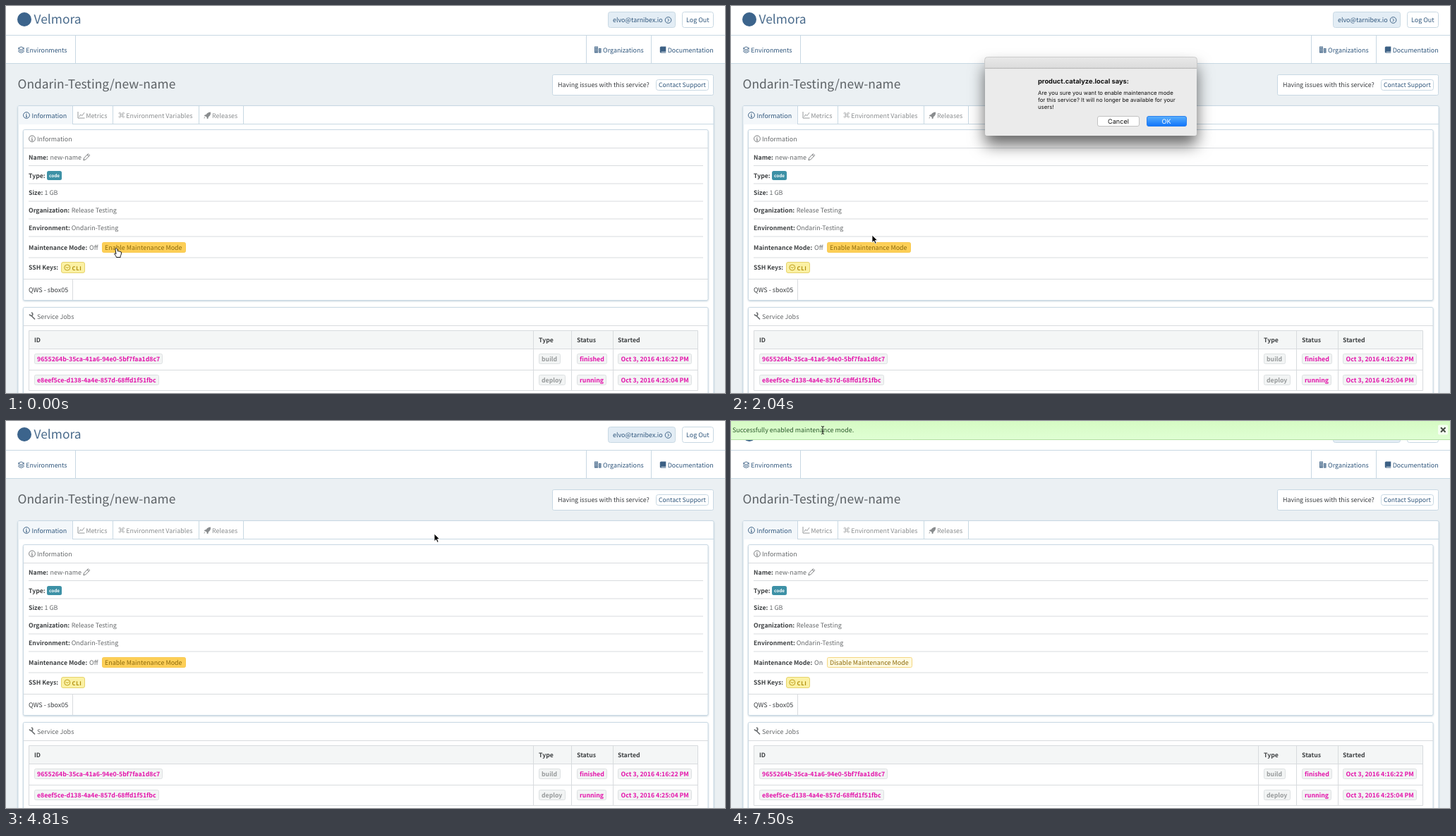
An HTML page for the animation above (8 s loop, 1019 px wide and 549 px high).

```html
<!DOCTYPE html>
<html lang="en">
<head>
<meta charset="utf-8">
<title>Maintenance mode</title>
<style>
html, body { margin: 0; width: 100%; height: 100%; overflow: hidden; background: #fff; }
svg { display: block; width: 1019px; height: 549px; }
text {
  font: 8.95px "Noto Sans CJK JP", "Noto Sans CJK SC", "Noto Sans CJK", "Open Sans", sans-serif;
  text-rendering: geometricPrecision; white-space: pre; fill: #66696b;
}
.big { font-size: 17.4px; font-weight: 300; fill: #5c6165; }
.brand { font-weight: 400; fill: #4a6b8c; }
.blue { fill: #2f567c; }
.dim { fill: #8a8d8f; }
.dark { fill: #3a3d40; }
.bold { font-size: 8.7px; font-weight: 700; fill: #3f4244; }
.pink { font-size: 8.75px; font-weight: 700; fill: #e414ab; }
.grey { font-size: 8.7px; font-weight: 700; fill: #979a9b; }
.amber { fill: #8c6a0c; }
.line { stroke: #d8dbde; fill: none; }
.edge { stroke: #c8d8e3; fill: none; }
.box { stroke: #c8d8e3; fill: #fff; }
.chip { stroke: #dde1e2; fill: #f2f4f4; }
.icon { fill: none; stroke-width: .9; }
.ui text { font-family: Inter, Roboto, sans-serif; font-size: 7.82px; fill: #111; }
.ui .head { font-size: 9.3px; font-weight: 700; }
.ui .btn { font-size: 9.1px; text-anchor: middle; }

.anim * { animation-duration: 8s; animation-iteration-count: infinite; animation-timing-function: step-end; }
#hand { animation-name: hand; }
#arrow { animation-name: arrow; }
#beam { animation-name: beam; }
#cursor { animation-name: move; }
#dialog { animation-name: dialog; transform-origin: 510px 129px; }
#pressed { animation-name: pressed; }
#banner { animation-name: banner; }
#off { animation-name: off; }
#wait { animation-name: wait; }
#on { animation-name: on; }

@keyframes hand { 0% { opacity: 1 } 19.125%, 100% { opacity: 0 } }
@keyframes arrow { 0% { opacity: 0 } 19.125% { opacity: 1 } 43% { opacity: 0 } 50.5% { opacity: 1 } 84.875%, 100% { opacity: 0 } }
@keyframes beam { 0% { opacity: 0 } 43% { opacity: 1 } 50.5% { opacity: 0 } 84.875%, 100% { opacity: 1 } }
@keyframes dialog {
  0% { opacity: 0; transform: scale(.367) }
  21.375% { opacity: .24; transform: scale(.367) }
  23.25% { opacity: 1; transform: scale(1) }
  60.125%, 100% { opacity: 0; transform: scale(1) }
}
@keyframes pressed { 0% { opacity: 0 } 58% { opacity: 1 } 60.125%, 100% { opacity: 0 } }
@keyframes banner { 0% { opacity: 0 } 62.375%, 100% { opacity: 1 } }
@keyframes off { 0% { opacity: 1 } 62.375%, 100% { opacity: 0 } }
@keyframes wait { 0% { opacity: 0 } 62.375% { opacity: 1 } 69.75%, 100% { opacity: 0 } }
@keyframes on { 0% { opacity: 0 } 69.75%, 100% { opacity: 1 } }
@keyframes move {
  0% { transform: translate(157px, 343px) }
  25.375% { transform: translate(200px, 325px) }
  27.5% { transform: translate(345px, 262px) }
  29.625% { transform: translate(520px, 190px) }
  31.75% { transform: translate(611px, 161px) }
  33.625% { transform: translate(614px, 161px) }
  43% { transform: translate(579px, 142.5px) }
  44.875% { transform: translate(547px, 130px) }
  46.75% { transform: translate(553px, 134px) }
  48.625% { transform: translate(577px, 146px) }
  50.5% { transform: translate(600px, 157px) }
  52.375% { transform: translate(607px, 160px) }
  77.5% { transform: translate(431px, 117px) }
  79.375% { transform: translate(310px, 78px) }
  81.25% { transform: translate(215px, 48px) }
  83% { transform: translate(160px, 28px) }
  84.875% { transform: translate(135px, 14px) }
  86.75% { transform: translate(127px, 9px) }
  88.5%, 100% { transform: translate(130px, 13px) }
}
</style>
</head>
<body>
<svg viewBox="0 0 1019 549" xmlns="http://www.w3.org/2000/svg">
  <defs>
    <filter id="shadow" x="-20%" y="-30%" width="140%" height="190%">
      <feDropShadow dx="0" dy="13" stdDeviation="11" flood-opacity=".6"/>
    </filter>
    <filter id="soft" x="-2%" y="-5%" width="104%" height="112%">
      <feDropShadow dx="0" dy="1" stdDeviation="1" flood-color="#7f9fb5" flood-opacity=".45"/>
    </filter>
    <linearGradient id="ok" x2="0" y2="1"><stop stop-color="#5bb0fb"/><stop offset="1" stop-color="#0f74fb"/></linearGradient>
    <linearGradient id="okDown" x2="0" y2="1"><stop stop-color="#3f8cf3"/><stop offset="1" stop-color="#0a55d8"/></linearGradient>
    <linearGradient id="bar" x2="0" y2="1"><stop stop-color="#e9e9e9"/><stop offset="1" stop-color="#dcdcdc"/></linearGradient>
    <linearGradient id="green" x2="0" y2="1"><stop stop-color="#d6fac4"/><stop offset="1" stop-color="#dfffd3"/></linearGradient>
    <g id="info" class="icon"><circle r="4.4"/><path d="M0-2.6v1.2M-1-.4H0V2.4M-1.2 2.4H1.2"/></g>
  </defs>

  <!-- page header -->
  <rect width="1019" height="549" fill="#ebf0f3"/>
  <rect width="1019" height="81" fill="#fff"/>
  <path class="edge" d="M0 41.5H1019M0 81.5H1019M98.5 42V81M822.5 42V81M914.5 42V81"/>
  <circle cx="26" cy="19" r="10" fill="#3c648c"/>
  <text class="big brand" x="39.5" y="25">Velmora</text>
  <rect class="box" x="853.5" y="8.5" width="95" height="22" rx="3" style="fill:#e3edf5"/>
  <text class="blue" x="860" y="23">elvo@tarnibex.io</text>
  <g class="icon" stroke="#2f567c"><circle cx="938.5" cy="20" r="4.3"/><path d="M937.5 17.8l2.2 2.2-2.2 2.2"/></g>
  <rect class="box" x="958.5" y="8.5" width="44" height="22" rx="3"/>
  <text class="blue" x="964" y="23">Log Out</text>

  <!-- navigation -->
  <path class="icon" stroke="#2f567c" d="M17.2 60l4.3-2.1 4.3 2.1-4.3 2.1zM17.2 62.2l4.3 2.1 4.3-2.1M17.2 64.4l4.3 2.1 4.3-2.1"/>
  <text class="blue" x="28.3" y="65.7">Environments</text>
  <path fill="#4a6c8d" d="M834 57.5h5v9h-5zM840 60h3.5v6.500H840z"/>
  <path stroke="#fff" fill="none" stroke-dasharray="1.3 1" d="M835.5 58.5v7M837.5 58.5v7M841.7 61v5"/>
  <text class="blue" x="846" y="65.7">Organizations</text>
  <path fill="#3c6084" d="M928 57.5h7.3v7.3h-6.700v.8h6.700v.9h-7.500q-1-.2-1-1.3V58.500z"/>
  <text class="blue" x="937.7" y="65.7">Documentation</text>

  <!-- title row -->
  <text class="big" x="16.5" y="116.7">Ondarin-Testing/new-name</text>
  <rect class="box" x="774.5" y="97.5" width="228" height="29" rx="2"/>
  <text class="dark" x="782" y="115.3">Having issues with this service?</text>
  <rect class="box" x="921.5" y="104.5" width="74" height="15" rx="3"/>
  <text class="blue" x="925" y="115.3" style="font-size:8.7px;font-weight:500">Contact Support</text>

  <!-- tabs -->
  <rect class="box" x="17" y="141.5" width="986" height="420" rx="2" filter="url(#soft)"/>
  <rect x="17.5" y="142" width="76.5" height="26" fill="#f3f7fa"/>
  <path class="edge" d="M94.5 142V167.5M151.5 142V167M273.5 142V167M336.5 142V167M94 167.5H1003"/>
  <use href="#info" x="29" y="155" stroke="#2f567c"/>
  <text class="blue" x="36.5" y="158.5">Information</text>
  <path class="icon" stroke="#8a8d8f" d="M102 150v9H111.500M103.700 157l2.300-3 1.700 1.700 3.300-4.500"/>
  <text class="dim" x="113.2" y="158.5">Metrics</text>
  <path class="icon" stroke="#a0a3a5" style="stroke-width:.75" d="M162.5 153.400h-1.200a1.200 1.200 0 1 1 1.200-1.200v5a1.200 1.200 0 1 1-1.200-1.200h5a1.200 1.200 0 1 1-1.200 1.200v-5a1.200 1.200 0 1 1 1.200 1.200z"/>
  <text class="dim" x="170.2" y="158.5">Environment Variables</text>
  <path fill="#8a8d8f" d="M290 150.500q-4.500 0-6.300 3.600l-2 .4-.9 1.800 2.300.2 1.500 1.500.2 2.300 1.800-.9.400-2.200q3.500-2 3-6.700zM281 157.500l1.300 1.300-1.800.7z"/>
  <text class="dim" x="292" y="158.5">Releases</text>

  <!-- information panel -->
  <rect class="box" x="24.5" y="175.5" width="970.5" height="242" rx="2" filter="url(#soft)"/>
  <path class="line" d="M25 201.5H995M32 226.5H988M32 252H988M32 277H988M32 302H988M32 327H988M32 357H988M25 387.500H995M94.500 388V417"/>
  <use href="#info" x="37" y="188.3" stroke="#6b6e70"/>
  <text x="44" y="192">Information</text>
  <text class="bold" x="32" y="218">Name:</text>
  <text x="62.5" y="218">new-name</text>
  <path class="icon" stroke="#6b6e70" d="M109.8 218.7l.8-3 5.800-6 2.200 2.200-5.800 6zM115 211l2.200 2.200"/>
  <text class="bold" x="32" y="243.5">Type:</text>
  <rect x="58" y="234" width="21" height="13" rx="2.5" fill="#3d91a6"/>
  <text x="61" y="242.8" style="font-size:6.4px;font-weight:700;fill:#fff">code</text>
  <text class="bold" x="32" y="268.3">Size:</text>
  <text x="54.5" y="268.3">1 GB</text>
  <text class="bold" x="32" y="293.3">Organization:</text>
  <text x="92.7" y="293.3">Release Testing</text>
  <text class="bold" x="32" y="318.2">Environment:</text>
  <text x="92.7" y="318.2">Ondarin-Testing</text>
  <text class="bold" x="32" y="346">Maintenance Mode:</text>
  <g class="anim">
    <g id="off">
      <text x="118" y="346">Off</text>
      <rect x="136.5" y="335.5" width="118" height="14" rx="2" fill="#fdcf57" stroke="#f8c94f"/>
      <text class="amber" x="140" y="346">Enable Maintenance Mode</text>
    </g>
    <g id="wait">
      <rect x="121.5" y="335.5" width="118" height="14" rx="2" fill="#fffae0" stroke="#f4d681"/>
      <text class="amber" x="125.5" y="346">Enable Maintenance Mode</text>
    </g>
    <g id="on">
      <text x="118" y="346">On</text>
      <rect x="136.5" y="335.5" width="120" height="14" rx="2" fill="#fffae0" stroke="#f4d681"/>
      <text class="amber" x="140" y="346">Disable Maintenance Mode</text>
    </g>
  </g>
  <text class="bold" x="32" y="374.3">SSH Keys:</text>
  <rect x="78.5" y="363.5" width="33" height="15" rx="2.5" fill="#fbf1a4" stroke="#e6d36c"/>
  <g class="icon" stroke="#b8960f"><circle cx="86.8" cy="371" r="4"/><path d="M84.800 370l2 2 2-2"/></g>
  <text x="93.5" y="374.5" style="font-size:7.7px;font-weight:700;letter-spacing:.6px;fill:#b08d0c">CLI</text>
  <text class="dark" x="32" y="406">QWS - sbox05</text>

  <!-- service jobs -->
  <rect class="box" x="24.5" y="427.5" width="970.5" height="140" rx="2" filter="url(#soft)"/>
  <path class="line" d="M25 453.5H995"/>
  <path fill="none" stroke="#6b6e70" stroke-width="1.7" d="M41 444.500l-4.500-4.500M33.400 437.200a2.300 2.300 0 0 0 4 1.400 2.300 2.300 0 0 0-1.500-3.600"/>
  <text x="44" y="443.7">Service Jobs</text>
  <rect x="32.5" y="460.5" width="948" height="26" fill="#f4f6f6"/>
  <path class="line" d="M32.500 460.500H980.500V545.500H32.500zM32 486.500H980M32 516.500H980M747.500 460V545M801.500 460V545M860.500 460V545"/>
  <text class="bold" x="40" y="476.7">ID</text>
  <text class="bold" x="755" y="476.7">Type</text>
  <text class="bold" x="809" y="476.7">Status</text>
  <text class="bold" x="867" y="476.7">Started</text>
  <g class="chip">
    <rect x="40.5" y="493.5" width="181" height="14" rx="2"/><rect x="755.5" y="493.5" width="30" height="14" rx="2"/>
    <rect x="809.5" y="493.5" width="42" height="14" rx="2"/><rect x="867.5" y="493.5" width="104" height="14" rx="2"/>
    <rect x="40.5" y="523.5" width="176" height="14" rx="2"/><rect x="755.5" y="523.5" width="37" height="14" rx="2"/>
    <rect x="809.5" y="523.5" width="41" height="14" rx="2"/><rect x="867.5" y="523.5" width="104" height="14" rx="2"/>
  </g>
  <text class="pink" x="44" y="503.8">9655264b-35ca-41a6-94e0-5bf7faa1d8c7</text>
  <text class="grey" x="759" y="503.8">build</text>
  <text class="pink" x="813" y="503.8">finished</text>
  <text class="pink" x="871.5" y="503.8">Oct 3, 2016 4:16:22 PM</text>
  <text class="pink" x="44" y="533.8">e8eef5ce-d138-4a4e-857d-68ffd1f51fbc</text>
  <text class="grey" x="759" y="533.8">deploy</text>
  <text class="pink" x="813" y="533.8">running</text>
  <text class="pink" x="871.5" y="533.8">Oct 3, 2016 4:25:04 PM</text>

  <g class="anim">
    <g id="banner">
      <rect width="1019" height="26" fill="url(#green)"/>
      <path stroke="#b2dfa2" d="M0 26.5H1019"/>
      <text x="2" y="15.5" style="fill:#2c5a2c">Successfully enabled maintenance mode.</text>
      <rect x="1002" y="5.500" width="14" height="14" rx="2" fill="#f4fff0"/>
      <path stroke="#444a42" stroke-width="2" d="M1006 9.300l6.500 6.500M1012.500 9.300l-6.500 6.500"/>
    </g>

    <g id="dialog" class="ui">
      <rect x="360" y="73" width="300" height="111" rx="4" fill="#ebebeb" filter="url(#shadow)"/>
      <path d="M359.500 88V76.500q0-4 4-4h293q4 0 4 4V88z" fill="url(#bar)" stroke="#c4c4c4" stroke-width=".8"/>
      <path stroke="#bcbcbc" d="M360 88.5H660"/>
      <text class="head" x="435" y="110">product.catalyze.local says:</text>
      <text x="435" y="125.8">Are you sure you want to enable maintenance mode</text>
      <text x="435" y="135.8">for this service? It will no longer be available for your</text>
      <text x="435" y="145.8">users!</text>
      <rect x="519.5" y="156.5" width="59" height="14" rx="2.5" fill="#fff" stroke="#c2c2c2"/>
      <text class="btn" x="549" y="166.6">Cancel</text>
      <rect x="589.5" y="156.5" width="56" height="14" rx="2.5" fill="url(#ok)" stroke="#2b80ee"/>
      <text class="btn" x="617" y="166.6" style="fill:#fff">OK</text>
      <g id="pressed">
        <rect x="589.5" y="156.5" width="56" height="14" rx="2.5" fill="url(#okDown)" stroke="#1f5fd0"/>
        <text class="btn" x="617" y="166.6" style="fill:#a9c9fa">OK</text>
      </g>
    </g>

    <g id="cursor">
      <path id="arrow" d="M0 0V10.500L2.500 8.300l1.800 3.900 1.800-.8-1.800-3.800H7.500z" fill="#000" stroke="#fff" stroke-width=".8"/>
      <path id="hand" d="M-1.500 1q1.500-1 2 .5l1 3.500q1-.8 1.800.2 1-.7 1.700.4 1.500-.3 1.500 1.400 0 3-1.300 4.500V13.500H-.5q-.5-2-3-5 .3-1.500 2.500.2L-2 2.500q-.2-1 .5-1.500z" fill="#fff" stroke="#000" stroke-width=".9"/>
      <path id="beam" d="M-2-5.500Q0-5.500 0-4Q0-5.500 2-5.500M0-4.500V4.500M-2 5.500Q0 5.500 0 4Q0 5.500 2 5.500M-1.300 2H1.300" fill="none" stroke="#222"/>
    </g>
  </g>
</svg>
</body>
</html>
```
